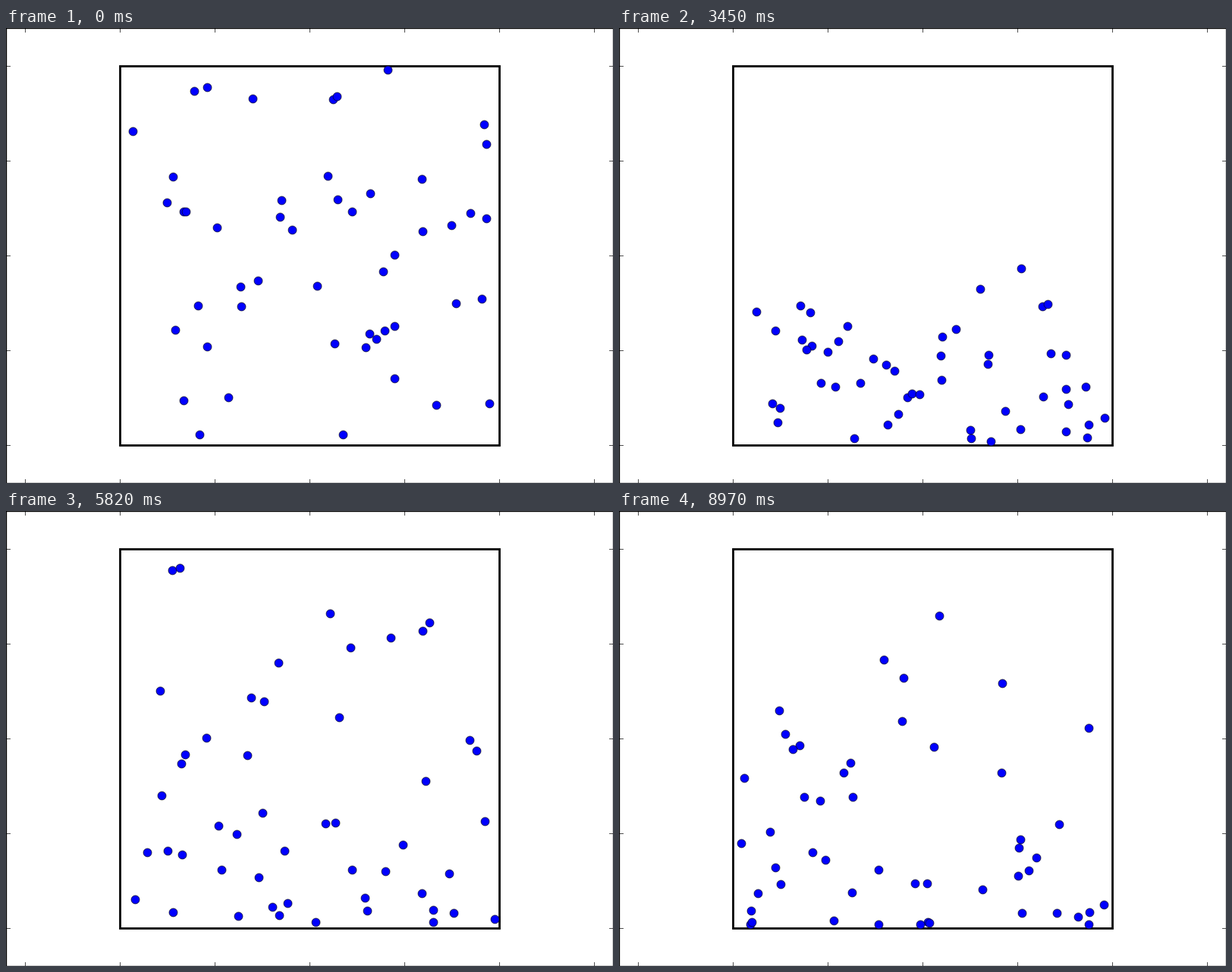
Animation of 800x600 px, one loop 9 s. Source, as an HTML page with a canvas:

```html
<!DOCTYPE html>
<html lang="en">
<head>
<meta charset="utf-8">
<title>Particles in a box</title>
<style>
  html, body { margin: 0; width: 100%; height: 100%; overflow: hidden; background: #fff; }
  canvas { display: block; width: 800px; height: 600px; }
</style>
</head>
<body>
<canvas id="stage" width="800" height="600"></canvas>
<script>
const COUNT = 50, STEPS = 300, STEP_MS = 30;
const DT = 1 / 30, SIZE = 0.04, MASS = 0.05, G = 9.8, BOUND = 2;
const SCALE = 125, WIDTH = 800, HEIGHT = 600;

// Mersenne Twister giving 53-bit doubles in [0, 1)
function twister(seed) {
  const N = 624, mt = new Uint32Array(N);
  let pos = N;
  mt[0] = seed;
  for (let i = 1; i < N; i++) {
    const s = mt[i - 1] ^ (mt[i - 1] >>> 30);
    mt[i] = Math.imul(1812433253, s) + i;
  }
  function next() {
    if (pos === N) {
      for (let i = 0; i < N; i++) {
        const y = (mt[i] & 0x80000000) | (mt[(i + 1) % N] & 0x7fffffff);
        mt[i] = mt[(i + 397) % N] ^ (y >>> 1) ^ (y & 1 ? 0x9908b0df : 0);
      }
      pos = 0;
    }
    let y = mt[pos++];
    y ^= y >>> 11;
    y ^= (y << 7) & 0x9d2c5680;
    y ^= (y << 15) & 0xefc60000;
    y ^= y >>> 18;
    return y >>> 0;
  }
  return () => {
    const hi = next() >>> 5, lo = next() >>> 6;
    return (hi * 67108864 + lo) / 9007199254740992;
  };
}

function makeParticles() {
  const random = twister(0);
  const centred = () => -0.5 + random();
  return Array.from({ length: COUNT }, () => ({
    x: centred() * 3.9, y: centred() * 3.9, vx: centred(), vy: centred()
  }));
}

// Elastic collision of two equal masses
function collide(a, b) {
  const rx = a.x - b.x, ry = a.y - b.y;
  const vx = a.vx - b.vx, vy = a.vy - b.vy;
  const total = MASS + MASS;
  const cx = (MASS * a.vx + MASS * b.vx) / total;
  const cy = (MASS * a.vy + MASS * b.vy) / total;
  const rr = rx * rx + ry * ry, vr = vx * rx + vy * ry;
  const nx = 2 * rx * vr / rr - vx;
  const ny = 2 * ry * vr / rr - vy;
  a.vx = cx + nx * MASS / total;
  a.vy = cy + ny * MASS / total;
  b.vx = cx - nx * MASS / total;
  b.vy = cy - ny * MASS / total;
}

function bounce(p, axis, speed) {
  const low = -BOUND + SIZE, high = BOUND - SIZE;
  if (p[axis] < low) {
    p[axis] = low;
    p[speed] *= -1;
  } else if (p[axis] > high) {
    p[axis] = high;
    p[speed] *= -1;
  }
}

function step(particles) {
  for (const p of particles) {
    p.x += DT * p.vx;
    p.y += DT * p.vy;
  }
  for (let i = 0; i < COUNT; i++) {
    for (let j = i + 1; j < COUNT; j++) {
      const a = particles[i], b = particles[j];
      const dx = a.x - b.x, dy = a.y - b.y;
      if (Math.sqrt(dx * dx + dy * dy) < 2 * SIZE) collide(a, b);
    }
  }
  for (const p of particles) {
    bounce(p, "x", "vx");
    bounce(p, "y", "vy");
    p.vy -= MASS * G * DT;
  }
}

// Marker centres sit on whole pixels
const snap = v => Math.floor(v + 0.5) + 0.5;

function simulate() {
  const particles = makeParticles();
  return Array.from({ length: STEPS }, () => {
    step(particles);
    return particles.map(p => [snap(WIDTH / 2 + SCALE * p.x), snap(HEIGHT / 2 - SCALE * p.y)]);
  });
}

const ctx = document.getElementById("stage").getContext("2d");
const poses = simulate();

function line(x1, y1, x2, y2) {
  ctx.beginPath();
  ctx.moveTo(x1, y1);
  ctx.lineTo(x2, y2);
  ctx.stroke();
}

function drawAxes() {
  ctx.strokeStyle = "#000";
  ctx.lineWidth = 2.78;
  ctx.strokeRect(150.5, 50.5, 500, 500);
  ctx.lineWidth = 0.69;
  for (let x = 25.5; x < WIDTH; x += SCALE) {
    line(x, 0, x, 6);
    line(x, HEIGHT - 5, x, HEIGHT);
  }
  for (let y = 50.5; y < HEIGHT; y += SCALE) {
    line(0, y, 6, y);
    line(WIDTH - 5, y, WIDTH, y);
  }
  ctx.lineWidth = 1.39;
  ctx.strokeRect(0.5, 0.5, WIDTH, HEIGHT);
}

function draw(time) {
  const index = Math.floor(Math.max(0, time) / STEP_MS) % STEPS;
  ctx.fillStyle = "#fff";
  ctx.fillRect(0, 0, WIDTH, HEIGHT);
  drawAxes();
  ctx.fillStyle = "#00f";
  ctx.lineWidth = 0.69;
  for (const [x, y] of poses[index]) {
    ctx.beginPath();
    ctx.arc(x, y, 5.5, 0, 2 * Math.PI);
    ctx.fill();
    ctx.stroke();
  }
}

const start = performance.now();
function tick() {
  draw(performance.now() - start);
  requestAnimationFrame(tick);
}
tick();
</script>
</body>
</html>
```
